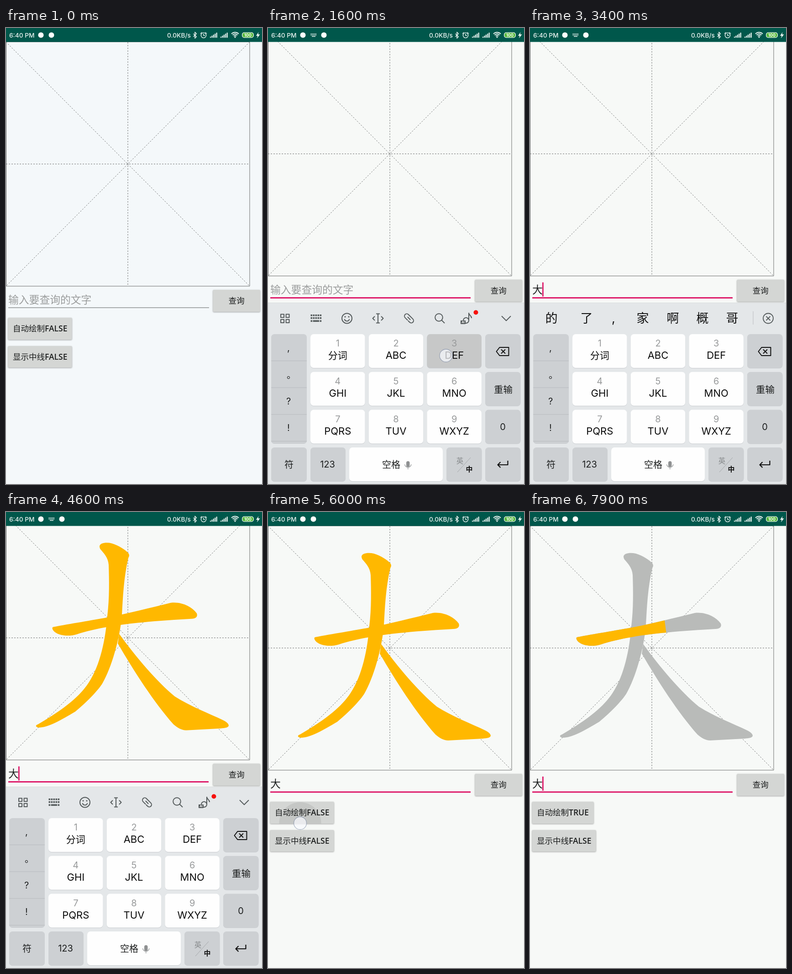
Write an HTML page with a canvas that moves like this. It is 561 px wide and 998 px high and loops after 8000 ms.

```html
<!DOCTYPE html>
<html lang="zh-CN">
<head>
<meta charset="utf-8">
<title>笔画演示</title>
<style>
html, body { margin: 0; width: 100%; height: 100%; overflow: hidden; background: #f7f9f7; }
canvas { display: block; width: 100vw; height: 100vh; }
</style>
</head>
<body>
<canvas id="stage"></canvas>
<script>
const W = 561, H = 998, LOOP = 8000;
const cv = document.getElementById('stage');
const dpr = window.devicePixelRatio || 1;
cv.width = W * dpr;
cv.height = H * dpr;
const c = cv.getContext('2d');

const CJK = '"Noto Sans CJK SC", "Noto Sans CJK JP", "Noto Sans CJK", sans-serif';
const UI = 'Inter, ' + CJK;
const ACCENT = '#dc0c60', INK = '#1c1e1e', ICON = '#555b5c';
const YELLOW = '#ffb800', GRAY = '#b9bbb9';

const HENG = new Path2D('M103 274C140 267 190 259 222 253C270 244 315 232 361 221C385 218 408 230 418 244C421 252 415 256 406 256C375 258 335 260 298 264C250 268 195 277 155 290C135 296 112 292 104 282C101 278 101 275 103 274Z');
const PIE = new Path2D('M205 97C206 90 220 88 232 91C248 96 260 104 268 112C271 117 270 119 268 123C258 165 256 210 254 247C250 300 230 365 212 396C203 412 175 440 152 459C120 478 92 494 72 494C64 493 64 489 70 487C130 452 162 425 181 396C207 357 218 300 222 250C227 210 226 170 225 138C224 122 214 112 207 104C205 101 205 98 205 97Z');
const NA = new Path2D('M248 289C285 340 330 393 370 426C405 448 445 463 476 478C484 482 488 486 488 490C487 494 480 495 470 496C445 497 420 499 395 500C385 500 375 494 367 487C325 440 280 370 245 310Z');

// [x, y, down, up]
const TAPS = [
  [237, 594, 700, 880], [390, 717, 1560, 1700], [276, 716, 1850, 2000],
  [50, 637, 2300, 2450], [505, 577, 2900, 3080], [522, 636, 4300, 4430],
  [522, 636, 4880, 5020], [70.5, 681, 5790, 6060]
];
const QUERY_TAP = TAPS[4], AUTO_TAP = TAPS[7];
const COMMIT = 2480, SHOWN = 3480, AUTO = 6080;

const seg = (t, a, b) => Math.min(1, Math.max(0, (t - a) / (b - a)));
const easeOut = p => 1 - (1 - p) ** 3;
const smooth = p => p * p * (3 - 2 * p);

function text(s, x, cy, size, color = INK, align = 'center', weight = 400, font = UI) {
  c.font = `${weight} ${size}px ${font}`;
  c.textAlign = align;
  c.fillStyle = color;
  c.fillText(s, x, cy + size * 0.37);
  return c.measureText(s).width;
}

function rect(x, y, w, h, color) {
  c.fillStyle = color;
  c.fillRect(x, y, w, h);
}

function box(x0, y0, x1, y1, r, color) {
  c.beginPath();
  c.roundRect(x0, y0, x1 - x0, y1 - y0, r);
  c.fillStyle = color;
  c.fill();
}

function dot(x, y, r, color) {
  c.beginPath();
  c.arc(x, y, r, 0, 7);
  c.fillStyle = color;
  c.fill();
}

function ring(x, y, r) {
  c.beginPath();
  c.arc(x, y, r, 0, 7);
  c.stroke();
}

function line(...p) {
  c.beginPath();
  for (let i = 0; i < p.length; i += 2) c.lineTo(p[i], p[i + 1]);
  c.stroke();
}

function pen(color, width) {
  c.strokeStyle = color;
  c.lineWidth = width;
}

function statusBar(t) {
  rect(0, 0, W, 30.5, '#00574b');
  const w = '#eef5f3', typing = t >= 1300 && t < 5400;
  text('6:40 PM', 7, 15.5, 13.7, w, 'left', 500);
  dot(76.5, 15.5, 6, '#fff');
  dot(typing ? 122.5 : 99.5, 15.5, 6, '#fff');
  if (typing) {
    for (let i = 0; i < 5; i++) {
      rect(93.5 + i * 2.7, 12, 1.7, 1.7, w);
      rect(93.5 + i * 2.7, 14.7, 1.7, 1.7, w);
    }
    rect(96, 17.6, 8, 1.6, w);
  }
  text('0.0KB/s', 353, 15.5, 13.7, w, 'left', 500);
  pen(w, 1.4);
  line(410.5, 12.5, 417.5, 19, 414, 22.5, 414, 9, 417.5, 12.5, 410.5, 19);
  ring(433, 16, 5.6);
  line(433, 12.5, 433, 16.5, 436, 16.5);
  line(426, 12.5, 429.5, 9.5);
  line(440, 12.5, 436.5, 9.5);
  for (const x of [447, 470])
    for (let i = 0; i < 5; i++) rect(x + i * 3.4, 19 - i * 2.2, 2.2, 2.2 + i * 2.2, w);
  pen(w, 1.8);
  for (const r of [4, 7.5, 11]) {
    c.beginPath();
    c.arc(502, 20.5, r, -Math.PI * 0.76, -Math.PI * 0.24);
    c.stroke();
  }
  dot(502, 20, 1.6, w);
  box(517, 9.5, 543, 21.5, 5, w);
  box(518.3, 10.8, 541.7, 20.2, 4, '#55b83c');
  text('100', 530, 15.5, 9, '#fff', 'center', 700);
  c.fillStyle = w;
  c.fill(new Path2D('M553.5 9L548 17H551.5L550 22.5L556.5 14H552.5Z'));
}

function grid() {
  pen('#6a6c6c', 1);
  c.strokeRect(0.5, 30.5, 533.5, 534.5);
  c.setLineDash([3, 3]);
  line(0, 297.7, 534, 297.7);
  line(267, 31, 267, 565);
  line(0, 30.5, 534, 565);
  line(534, 30.5, 0, 565);
  c.setLineDash([]);
}

function glyph(t) {
  if (t < SHOWN) return;
  const auto = t >= AUTO;
  c.fillStyle = auto ? GRAY : YELLOW;
  for (const p of [PIE, NA, HENG]) c.fill(p);
  if (!auto) return;
  const edge = 296.5 - 0.168 * (7900 - t);
  if (edge < 102) return;
  c.save();
  c.beginPath();
  c.moveTo(0, 200);
  c.lineTo(edge - 6.5, 200);
  c.lineTo(edge + 6.5, 300);
  c.lineTo(0, 300);
  c.clip();
  c.fillStyle = YELLOW;
  c.fill(HENG);
  c.restore();
}

function button(x0, y0, x1, y1, label, word, t, tap, pan) {
  c.save();
  c.shadowColor = 'rgba(0,0,0,.35)';
  c.shadowBlur = 3 * dpr;
  c.shadowOffsetY = dpr;
  box(x0, y0, x1, y1, 2, '#d4d6d4');
  c.restore();
  if (tap && t >= tap[2] && t < tap[3] + 300) {
    c.save();
    c.beginPath();
    c.rect(x0, y0, x1 - x0, y1 - y0);
    c.clip();
    const fade = 1 - seg(t, tap[3], tap[3] + 300);
    const r = 12 + 34 * seg(t, tap[2], tap[2] + 210) + 90 * seg(t, tap[3], tap[3] + 200);
    dot(tap[0], tap[1] + pan, r, `rgba(0,0,0,${0.07 * fade})`);
    c.restore();
  }
  const cy = (y0 + y1) / 2;
  if (!word) return text(label, (x0 + x1) / 2, cy, 17.4, INK, 'center', 400, CJK);
  const w = text(label, x0 + 10.5, cy, 17.5, INK, 'left', 400, CJK);
  text(word, x0 + 10.5 + w, cy, 17.5, INK, 'left', 600, '"Open Sans", "Noto Sans", sans-serif');
}

function field(t) {
  const focus = t >= 860, typed = t >= COMMIT;
  if (typed) text('大', 5, 595, 22.8, INK, 'left', 400, CJK);
  else text('输入要查询的文字', 5, 595, 22.8, '#9b9d9d', 'left', 300, CJK);
  if (!focus) return rect(5, 611.5, 440, 1.2, '#77797a');
  rect(5, 611.5, 439, 2.8, ACCENT);
  const on = typed ? Math.floor((t - 3390) / 506) % 2 === 0 : (t - 900) % 1012 < 506;
  if (on) rect(typed ? 27 : 5, 579, 2.6, 31, ACCENT);
}

function app(t, pan) {
  c.save();
  c.translate(0, -pan);
  rect(0, 0, W, H, t < 700 ? '#f4f8fa' : '#f7f9f7');
  grid();
  glyph(t);
  field(t);
  const auto = t >= AUTO;
  button(453.5, 573, 557, 621, '查询', '', t, QUERY_TAP, pan);
  button(4.5, 634, auto ? 139.5 : 144.5, 682, '自动绘制', auto ? 'TRUE' : 'FALSE', t, AUTO_TAP, pan);
  button(4.5, 696, 144.5, 743, '显示中线', 'FALSE');
  c.restore();
}

function toolbar() {
  pen(ICON, 2);
  for (const x of [28, 39.5]) for (const y of [626.5, 638]) c.strokeRect(x, y, 7, 7);
  for (let i = 0; i < 5; i++) for (const y of [627, 633]) rect(93.5 + i * 5, y, 3.6, 3.6, ICON);
  rect(93.5, 639.5, 3.6, 3.6, ICON);
  rect(98.5, 639.5, 13.6, 3.6, ICON);
  rect(113.5, 639.5, 3.6, 3.6, ICON);
  ring(173, 635.5, 11);
  dot(169, 632, 1.6, ICON);
  dot(177, 632, 1.6, ICON);
  c.beginPath();
  c.arc(173, 636, 5.5, 0.2, Math.PI - 0.2);
  c.stroke();
  line(241, 626, 241, 645);
  line(237, 625.5, 245, 625.5);
  line(237, 645.5, 245, 645.5);
  line(234, 631, 229.5, 635.5, 234, 640);
  line(248, 631, 252.5, 635.5, 248, 640);
  c.save();
  c.translate(309, 635.5);
  c.rotate(Math.PI / 4);
  line(-4.5, 0, 4.5, 0);
  c.stroke(new Path2D('M1 5H-7A5 5 0 0 1-7-5H-1M-1-5H7A5 5 0 0 1 7 5H2'));
  c.restore();
  ring(374.5, 633.5, 8.3);
  line(380.5, 639.5, 387, 646);
  ring(434, 640, 6);
  c.stroke(new Path2D('M440 640V624C441 630 446 629 446 635'));
  box(422, 640, 433, 648, 1, ICON);
  text('AI', 427.5, 644, 6.5, '#fff', 'center', 700);
  dot(455.5, 622.5, 5, '#f6100c');
  line(512, 630.5, 522, 640.5, 532, 630.5);
}

function candidates(words) {
  const xs = [47, 124, 183, 247, 313, 378, 443];
  [...words].forEach((w, i) => text(w, xs[i], 635, 27, '#111'));
  rect(488.5, 620, 1, 29, '#b9bcc0');
  pen(ICON, 1.8);
  ring(522, 635.5, 11);
  line(517.5, 631, 526.5, 640);
  line(526.5, 631, 517.5, 640);
}

function key(x0, y0, x1, y1, color) {
  box(x0, y0 + 1, x1, y1 + 1, 7, '#c9ccd0');
  box(x0, y0, x1, y1, 7, color);
}

function keyboard(t, top) {
  c.save();
  c.translate(0, top - 601);
  rect(0, 601, W, 400, '#e4e7e9');
  rect(0, 601, W, 1, '#d9dcde');
  const first = t >= 1700 && t < 2000, second = t >= 2000 && t < COMMIT;
  if (first) candidates('的得大到等对非');
  else if (second) candidates('大打发达法答罚');
  else if (t >= COMMIT && t < 4450) candidates('的了,家啊概哥');
  else toolbar();

  const dark = '#cdd0d3', white = '#fefefe', down = '#c7c8c8';
  key(7, 670, 85, 909, dark);
  for (let i = 0; i < 4; i++) rect(7, 728 + i * 58.6, 78, 1, '#b7babe');
  if (first || second) {
    (first ? ['d', 'e', 'f'] : ['da', 'fa', 'd', 'f'])
      .forEach((s, i) => text(s, 46, 700 + i * 58.5, 20));
  } else {
    text(',', 45, 699.5, 20);
    text('。', 51, 760, 20);
    text('?', 45, 817, 20);
    text('!', 45, 875, 20);
  }

  const names = ['分词', 'ABC', 'DEF', 'GHI', 'JKL', 'MNO', 'PQRS', 'TUV', 'WXYZ'];
  names.forEach((s, i) => {
    const x = 93 + i % 3 * 127.7, y = 670 + Math.floor(i / 3) * 82.8;
    const tap = i === 2 ? TAPS[1] : i === 1 ? TAPS[2] : null;
    const held = tap && t >= tap[2] && t < tap[3];
    key(x, y, x + 119.5, y + 74, held ? down : white);
    text(i + 1, x + 59.8, y + 20, 20, '#989a9b');
    text(s, x + 59.8, y + 46, i ? 22 : 21, '#0c0c0c');
  });
  for (let i = 0; i < 3; i++) key(476, 670 + i * 82.8, 553.5, 744 + i * 82.8, dark);
  key(7, 918, 85, 992, dark);
  key(93, 918, 170, 992, dark);
  key(178, 918, 383, 992, white);
  key(391, 918, 468.5, 992, dark);
  key(476, 918, 553.5, 992, dark);

  pen('#111', 2);
  c.stroke(new Path2D('M507.5 699H527.5V717H507.5L500.5 708Z'));
  line(511, 703.5, 520, 712.5);
  line(520, 703.5, 511, 712.5);
  text('重输', 515.5, 791, 20.5);
  text('0', 514.5, 873, 20);
  text('符', 46, 956, 20);
  text('123', 130.5, 955, 20);
  text('空格', 270, 956, 20);
  box(303, 948, 310.5, 961, 4, '#8f9192');
  pen('#a3a5a6', 1.5);
  c.stroke(new Path2D('M299.5 955A7.3 7.3 0 0 0 314 955M306.7 962V966'));
  text('英', 420.5, 947, 15.5, '#85888a');
  text('中', 441, 965, 15, '#111', 'center', 700);
  pen('#a3a6a9', 1);
  line(415, 972, 444, 940);
  pen('#111', 2.2);
  line(525.5, 947, 525.5, 956, 504, 956);
  line(509.5, 950, 503.5, 956, 509.5, 962);
  c.restore();
}

function touches(t) {
  for (const [x, y, a, b] of TAPS) {
    if (t < a || t > b + 150) continue;
    c.globalAlpha = 1 - 0.85 * seg(t, b, b + 150);
    dot(x, y, 13.5, 'rgba(248,250,253,.72)');
    pen('rgba(120,135,165,.55)', 1.3);
    ring(x, y, 14);
    c.globalAlpha = 1;
  }
}

function draw(t) {
  c.setTransform(dpr, 0, 0, dpr, 0, 0);
  c.lineJoin = 'round';
  rect(0, 0, W, H, '#000');
  const pan = 22.3 * (easeOut(seg(t, 820, 1125)) - easeOut(seg(t, 5080, 5300)));
  const lift = smooth(seg(t, 965, 1400)) - smooth(seg(t, 5050, 5380));
  app(t, pan);
  if (lift > 0) keyboard(t, H - 397 * lift);
  statusBar(t);
  touches(t);
}

const start = performance.now();
function tick() {
  draw((performance.now() - start) % LOOP);
  requestAnimationFrame(tick);
}
tick();
</script>
</body>
</html>
```
